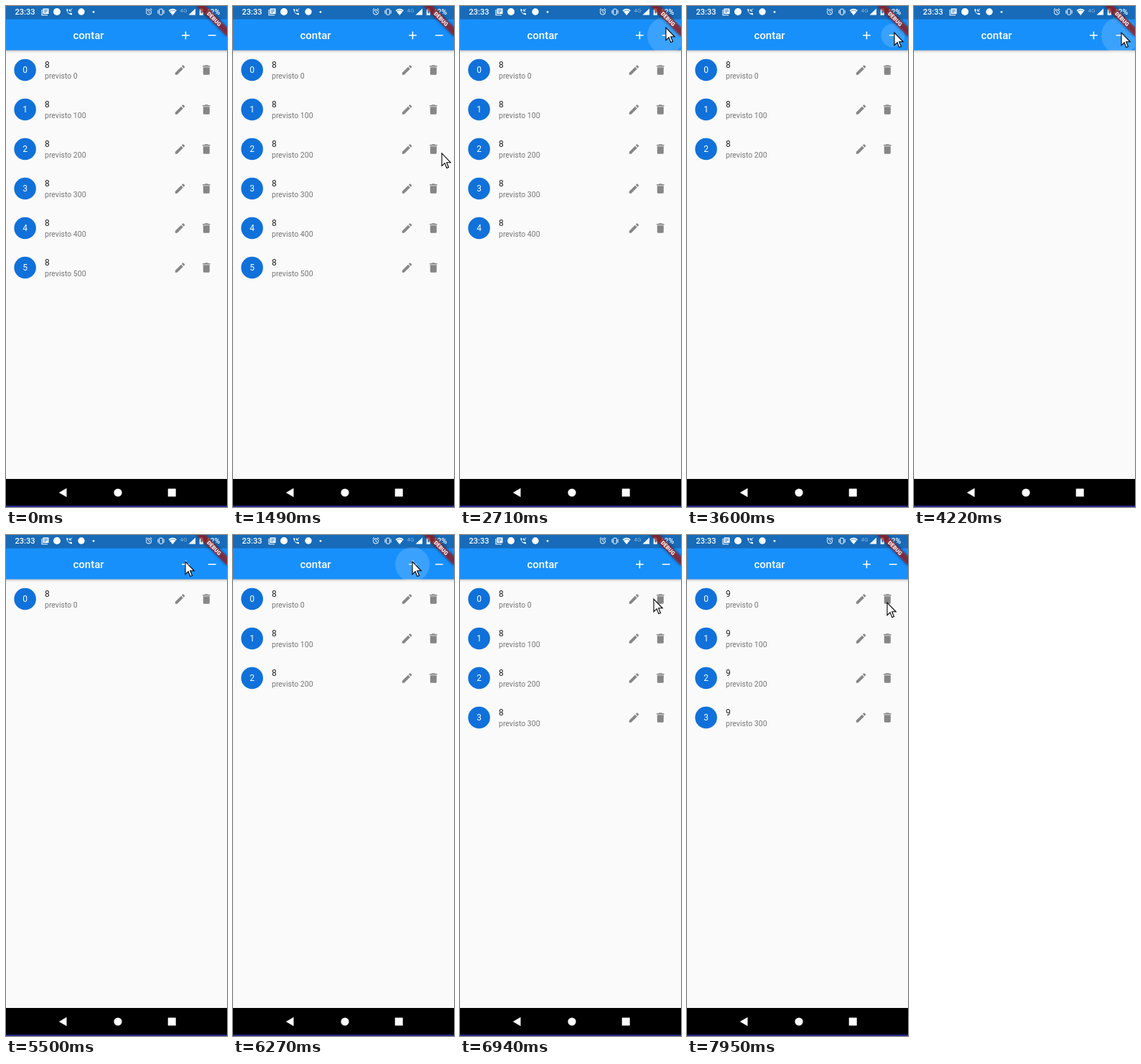
These frames come from a looping animation (308x697 px, 8 s). An HTML page:

```html
<!DOCTYPE html>
<html lang="pt">
<head>
<meta charset="utf-8">
<title>contar</title>
<style>
  html, body { margin: 0; width: 100%; height: 100%; overflow: hidden; background: #fafafa; }
  svg { display: block; width: 308px; height: 697px; font-family: Roboto, sans-serif; }
</style>
</head>
<body>
<svg viewBox="0 0 308 697">
  <defs>
    <linearGradient id="shade" x2="0" y2="1">
      <stop offset="0" stop-opacity=".3"/>
      <stop offset=".4" stop-opacity=".1"/>
      <stop offset="1" stop-opacity="0"/>
    </linearGradient>
    <filter id="blur" x="-20%" y="-80%" width="140%" height="260%"><feGaussianBlur stdDeviation="3"/></filter>
    <path id="edit" d="M3 17.25V21h3.75L17.81 9.94l-3.75-3.75L3 17.25zM20.71 7.04a1 1 0 0 0 0-1.41l-2.34-2.34a1 1 0 0 0-1.41 0l-1.83 1.83 3.75 3.75 1.83-1.83z"/>
    <path id="trash" d="M6 19a2 2 0 0 0 2 2h8a2 2 0 0 0 2-2V7H6v12zM19 4h-3.5l-1-1h-5l-1 1H5v2h14V4z"/>
  </defs>

  <rect width="308" height="697" fill="#fafafa"/>
  <g id="list"></g>

  <!-- app bar -->
  <rect y="61" width="308" height="5" fill="url(#shade)"/>
  <rect y="18" width="308" height="43.5" fill="#1890fc"/>
  <rect width="308" height="18.5" fill="#176bb9"/>
  <g id="ripples" fill="#fff"></g>
  <text x="93.4" y="46" font-size="15" font-weight="500" fill="#fff">contar</text>
  <path d="M245 40.8h10.8M250.4 35.4v10.8M281.8 40.8h10.8" stroke="#fff" stroke-width="1.6"/>

  <!-- status bar -->
  <g fill="#fff">
    <text x="12.6" y="12.4" font-size="11" font-weight="500">23:33</text>
    <path d="M51.5 3.5h8v7.5h-8z"/>
    <path d="M50 5v7.7h8" fill="none" stroke="#fff" stroke-width="1.1"/>
    <path d="M53 5.6h5M53 7.3h5M53 9h3" stroke="#176bb9" stroke-width=".8"/>
    <circle cx="71" cy="8" r="5"/>
    <path d="M84.2 4.2q.3 6.8 7.8 8.2v-2.2l-2.1-.6-1.2 1q-2.300-1.200-3-3.200l1-1.100-.6-2.100z"/>
    <path d="M92 3.600l-3.400 3.400m0-2.700v2.700h2.700" fill="none" stroke="#fff"/>
    <circle cx="105" cy="8" r="4.700"/>
    <circle cx="122" cy="8.300" r="1.400"/>
    <g fill="none" stroke="#fff">
      <circle cx="199" cy="8.500" r="3.600"/>
      <path d="M199 6.300v2.400l1.700 1M194.600 5.300l2.300-2M203.400 5.300l-2.300-2"/>
      <rect x="213.700" y="4.300" width="4.600" height="7.800" rx=".7"/>
      <path d="M211.900 5.800v4.800M220.100 5.800v4.800"/>
    </g>
    <path d="M226.500 6q5.700-4.600 11.400 0l-5.700 7z"/>
    <path d="M228.200 7.200q4-2.800 8 0" fill="none" stroke="#176bb9" stroke-width=".7"/>
    <text x="242.500" y="9" font-size="8" opacity=".5">4G</text>
    <path d="M264 3.500v9h-9.500z"/>
    <path d="M271 3.200h2.600v1h1.300v8.500h-5.200V4.200h1.300z"/>
    <path d="M272.700 5.500l-1.700 3.300h1.200v2.500l1.700-3.400h-1.200z" fill="#176bb9"/>
    <text x="278.500" y="12.400" font-size="10.500" font-weight="500">42%</text>
  </g>
  <g transform="translate(308 0) scale(.75) rotate(45)">
    <rect x="-40" y="28" width="80" height="12" opacity=".5" filter="url(#blur)"/>
    <rect x="-40" y="28" width="80" height="12" fill="#b71c1c" fill-opacity=".63"/>
    <text y="37.600" font-size="10.200" font-weight="900" fill="#fff" text-anchor="middle">DEBUG</text>
  </g>

  <!-- navigation bar -->
  <rect y="658" width="308" height="39"/>
  <rect y="695" width="308" height="2" fill="#26268a"/>
  <g fill="#fff">
    <path d="M73.800 677l10.700-6.200v12.400z"/>
    <circle cx="156" cy="677" r="5.600"/>
    <rect x="225.700" y="671.500" width="11" height="11" rx=".6"/>
  </g>

  <path id="cursor" d="M0 0V17.600L4.100 13.700 6.900 20.600 9.500 19.500 6.700 12.800H12.200Z" fill="#fff" stroke="#000" stroke-width="1.100"/>
</svg>
<script>
const LOOP = 8000, FLIP = 7600, MINUS = 287, PLUS = 250;
const $ = id => document.getElementById(id);

// [time, rows shown from then on, button pressed]
const taps = [
  [2600, 5, MINUS], [3020, 4, MINUS], [3600, 3, MINUS], [3780, 2, MINUS], [3960, 1, MINUS],
  [4120, 0, MINUS], [5230, 1, PLUS], [5760, 2, PLUS], [6200, 3, PLUS], [6520, 4, PLUS]
];

// [time, x, y] of the pointer tip
const path = [
  [660, 207, 690], [1100, 216, 550], [1420, 242, 299], [1490, 291, 205], [1600, 292, 196],
  [1900, 295, 100], [2240, 287, 30], [3460, 287, 30], [3600, 289, 37], [4280, 289, 37],
  [4420, 281, 38], [4900, 250, 37], [6600, 250, 37], [6940, 270, 89], [7280, 276, 95], [7950, 279, 94]
];

$('list').innerHTML = [0, 1, 2, 3, 4, 5].map(i => `
  <g transform="translate(0 ${i * 55})">
    <circle cx="26.6" cy="89" r="15.3" fill="#1071da"/>
    <text x="26.6" y="93.2" font-size="12" fill="#fff" text-anchor="middle">${i}</text>
    <text class="count" x="54" y="86" font-size="12" fill="#212121">8</text>
    <text x="54" y="101" font-size="10.5" fill="#757575">previsto ${i * 100}</text>
    <g fill="#868686">
      <use href="#edit" transform="translate(233.5 80) scale(.75)"/>
      <use href="#trash" transform="translate(270.3 80) scale(.75)"/>
    </g>
  </g>`).join('');
$('ripples').innerHTML = taps.map(tap => `<circle cx="${tap[2]}" cy="41"/>`).join('');

const rows = [...$('list').children];
const ripples = [...$('ripples').children];
const counts = document.querySelectorAll('.count');
const clamp = v => Math.max(0, Math.min(1, v));
const show = (el, on) => el.setAttribute('visibility', on ? 'visible' : 'hidden');

function pointer(t) {
  const i = path.findIndex(key => key[0] > t);
  if (i < 0) return path[path.length - 1].slice(1);
  const [t0, x0, y0] = path[i - 1], [t1, x1, y1] = path[i];
  const k = (t - t0) / (t1 - t0);
  return [x0 + (x1 - x0) * k, y0 + (y1 - y0) * k];
}

function draw(t) {
  const shown = taps.reduce((n, tap) => t >= tap[0] ? tap[1] : n, 6);
  rows.forEach((row, i) => show(row, i < shown));
  counts.forEach(el => el.textContent = t < FLIP ? 8 : 9);

  ripples.forEach((el, i) => {
    const age = t - taps[i][0] + 80;
    el.setAttribute('r', 8 + 18 * clamp(age / 170));
    el.setAttribute('opacity', .15 * clamp(age / 70) * clamp((330 - age) / 130));
  });

  const visible = t >= path[0][0];
  show($('cursor'), visible);
  if (visible) $('cursor').setAttribute('transform', `translate(${pointer(t)})`);
}

function tick() {
  draw(performance.now() % LOOP);
  requestAnimationFrame(tick);
}
tick();
</script>
</body>
</html>
```
